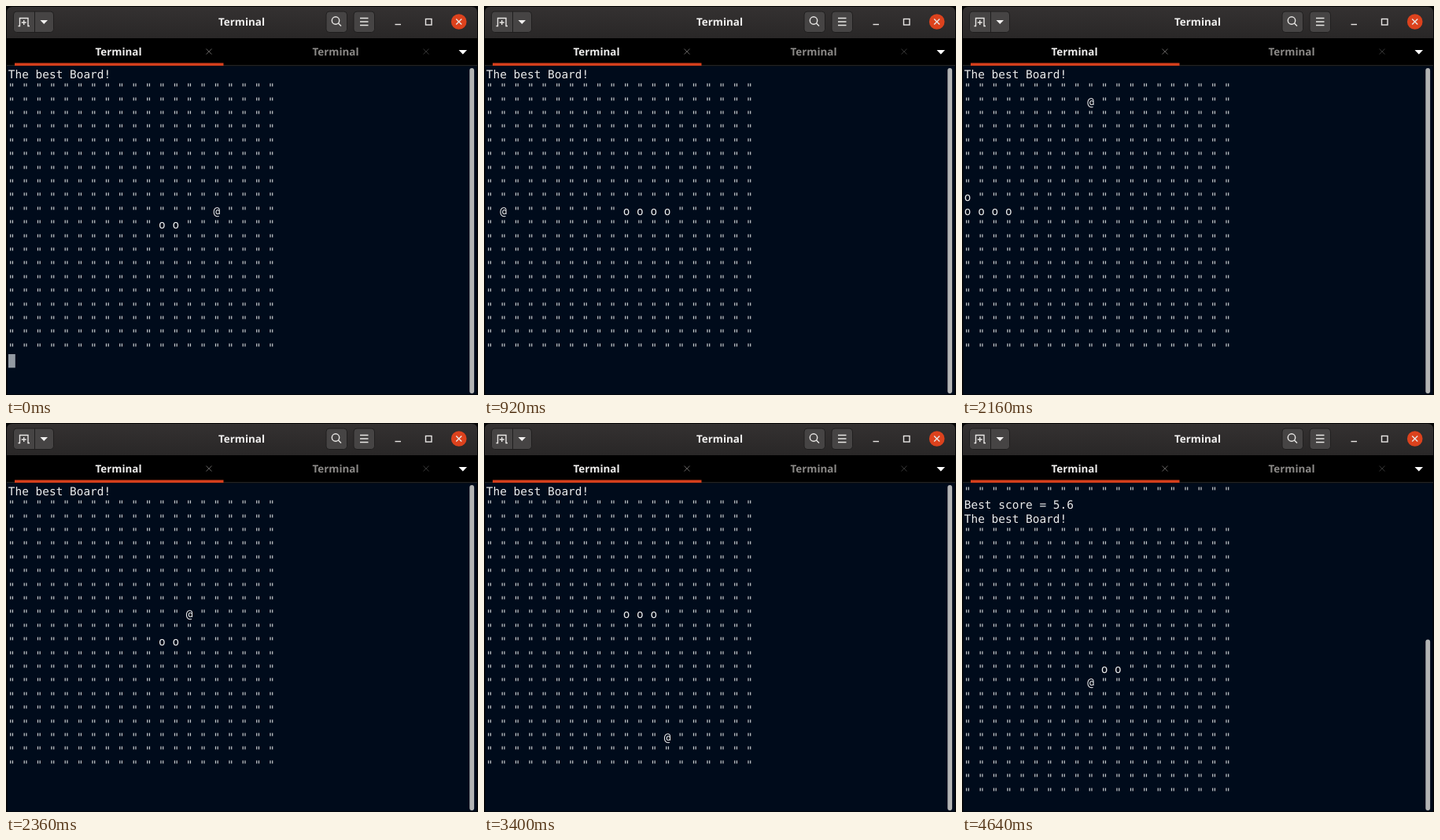
Write an HTML page that moves like this. It is 600x495 px and loops after 4660 ms.

```html
<!DOCTYPE html>
<html lang="en">
<head>
<meta charset="utf-8">
<title>Terminal snake</title>
<style>
  html, body { margin: 0; width: 100%; height: 100%; overflow: hidden; background: #000; }
  svg { display: block; width: 100%; height: 100%; }
  text { text-rendering: geometricPrecision; white-space: pre; }
  .ui { font: bold 13.4px "Noto Sans", "Open Sans", sans-serif; text-anchor: middle; fill: #f0efee; }
  .mono { font: 14.45px "DejaVu Sans Mono", "Liberation Mono", monospace; fill: #ececec; }
  .dots { fill: #c6cacd; }
  .btn { fill: #464444; stroke: #201f1f; }
  .ico { fill: none; stroke: #e8e6e4; stroke-width: 1.4; }
</style>
</head>
<body>
<svg viewBox="0 0 600 495">
  <defs>
    <linearGradient id="bar" x2="0" y2="1">
      <stop offset="0" stop-color="#343131"/>
      <stop offset="1" stop-color="#292727"/>
    </linearGradient>
  </defs>
  <rect width="600" height="495" fill="#050505"/>
  <path d="M1 41V8Q1 1 8 1H592Q599 1 599 8V41Z" fill="url(#bar)"/>
  <rect x="1" y="41" width="598" height="35" fill="#000"/>
  <rect x="1" y="75" width="598" height="1.5" fill="#232323"/>
  <rect x="1.5" y="76.5" width="597" height="418" fill="#000b1b"/>
  <rect x="11" y="72.5" width="265.500" height="3.500" fill="#d43f1d"/>

  <rect class="btn" x="9.500" y="7" width="51" height="26.500" rx="4"/>
  <path d="M36.500 7V33.500" stroke="#201f1f"/>
  <path class="ico" d="M15.500 25.500H17.500V15.500H28V25.500H30M22.750 18V24M19.750 21H25.750"/>
  <path d="M43.500 18H53L48.250 23Z" fill="#f0efee"/>
  <rect class="btn" x="407" y="7" width="26.500" height="26.500" rx="4"/>
  <circle class="ico" cx="419" cy="18.500" r="4.700"/>
  <path class="ico" d="M422.500 22L426 25.500"/>
  <rect class="btn" x="442" y="7" width="26.500" height="26.500" rx="4"/>
  <path class="ico" d="M450 15.500H460.500M450 20H460.500M450 24.500H460.500"/>
  <path class="ico" d="M494.500 23.500H502"/>
  <rect class="ico" x="533.500" y="16.500" width="7.500" height="7.500"/>
  <circle cx="575.700" cy="20" r="9.800" fill="#dc421d"/>
  <path class="ico" d="M572.200 16.500L579.200 23.500M579.200 16.500L572.200 23.500"/>

  <text class="ui" x="299.500" y="24.800">Terminal</text>
  <text class="ui" x="143" y="62.800">Terminal</text>
  <text class="ui" x="419" y="62.800" style="fill:#8b8987">Terminal</text>
  <path d="M254.500 54.500L261.500 61.500M261.500 54.500L254.500 61.500" stroke="#5d5b5a"/>
  <path d="M530.500 54.500L537.500 61.500M537.500 54.500L530.500 61.500" stroke="#333"/>
  <path d="M575.500 56H586L580.750 61.500Z" fill="#fff"/>

  <g id="lines"></g>
  <rect id="cursor" x="3" y="443" width="8.800" height="17.300" fill="#939aa2"/>
  <rect id="scroll" x="589.300" width="5.800" rx="2.900" fill="#b3b4b4"/>
</svg>
<script>
const LOOP = 4660, SIZE = 20, LINES = 23, PITCH = 17.4;
const DIRS = { R: [1, 0], L: [-1, 0], U: [0, -1] };
const $ = id => document.getElementById(id);

// pace: [step, ms] pairs; steps are evenly spaced between them
const games = [
  { body: [[12, 10], [11, 10]], moves: 'RRRU' + 'L'.repeat(15) + 'U',
    foods: [[15, 9], [12, 9], [1, 9], [9, 1]],
    pace: [[0, 0], [9, 870], [14, 1330], [20, 1950]] },
  { body: [[11, 10], [10, 10]], moves: 'RRRRUU' + 'L'.repeat(15),
    foods: [[13, 8], [13, 17]], intro: true,
    pace: [[0, 2180], [5, 2700], [10, 3262], [11, 3365], [14, 3805], [21, 4440]] },
  { body: [[11, 10], [10, 10]], moves: '', foods: [[9, 11]], intro: true,
    pace: [[0, 4640]] }
];

function addText(cls, i) {
  const el = document.createElementNS('http://www.w3.org/2000/svg', 'text');
  el.setAttribute('class', cls);
  el.setAttribute('x', 2.8);
  el.setAttribute('y', 91.8 + i * PITCH);
  return $('lines').appendChild(el);
}
const rows = Array.from({ length: LINES }, (_, i) =>
  ({ dots: addText('mono dots', i), bright: addText('mono', i) }));

function stepAt(pace, t) {
  for (let i = 1; i < pace.length; i++) {
    const [s0, t0] = pace[i - 1], [s1, t1] = pace[i];
    if (t < t1) {
      const gap = (t1 - t0) / (s1 - s0), n = Math.floor((t - t0) / gap);
      return { step: s0 + n, age: t - t0 - n * gap };
    }
  }
  const [step, start] = pace[pace.length - 1];
  return { step, age: t - start };
}

function play(game, steps) {
  const body = game.body.slice();
  let eaten = 0;
  for (const m of game.moves.slice(0, steps)) {
    const [x, y] = body[0], [dx, dy] = DIRS[m];
    const head = [x + dx, y + dy], food = game.foods[eaten];
    body.unshift(head);
    if (head[0] === food[0] && head[1] === food[1]) eaten++;
    else body.pop();
  }
  return { body, food: game.foods[eaten] };
}

const line = cells => cells.join(' ');
const plain = { dots: line(Array(SIZE).fill('"')), bright: '' };
const label = s => ({ dots: '', bright: s });

function boardLines({ body, food }) {
  const marks = Array.from({ length: SIZE }, () => Array(SIZE).fill(' '));
  marks[food[1]][food[0]] = '@';
  for (const [x, y] of body) marks[y][x] = 'o';
  return marks.map(row => ({
    dots: line(row.map(c => c === ' ' ? '"' : ' ')),
    bright: line(row)
  }));
}

function draw(t) {
  const game = games.filter(g => t >= g.pace[0][1]).pop();
  const { step, age } = stepAt(game.pace, t);
  const scrolled = game.intro && step === 0;
  const out = [label('The best Board!'), ...boardLines(play(game, step))];
  if (scrolled) out.unshift(plain, label('Best score = 5.6'));
  rows.forEach((row, i) => {
    const src = out[i] || label('');
    row.dots.textContent = src.dots;
    row.bright.textContent = src.bright;
  });
  const top = scrolled ? 275.5 : 79;
  $('scroll').setAttribute('y', top);
  $('scroll').setAttribute('height', 493 - top);
  $('cursor').style.visibility = !scrolled && age < 30 ? 'visible' : 'hidden';
}

const start = performance.now();
function tick() {
  draw((performance.now() - start) % LOOP);
  requestAnimationFrame(tick);
}
draw(0);
requestAnimationFrame(tick);
</script>
</body>
</html>
```
